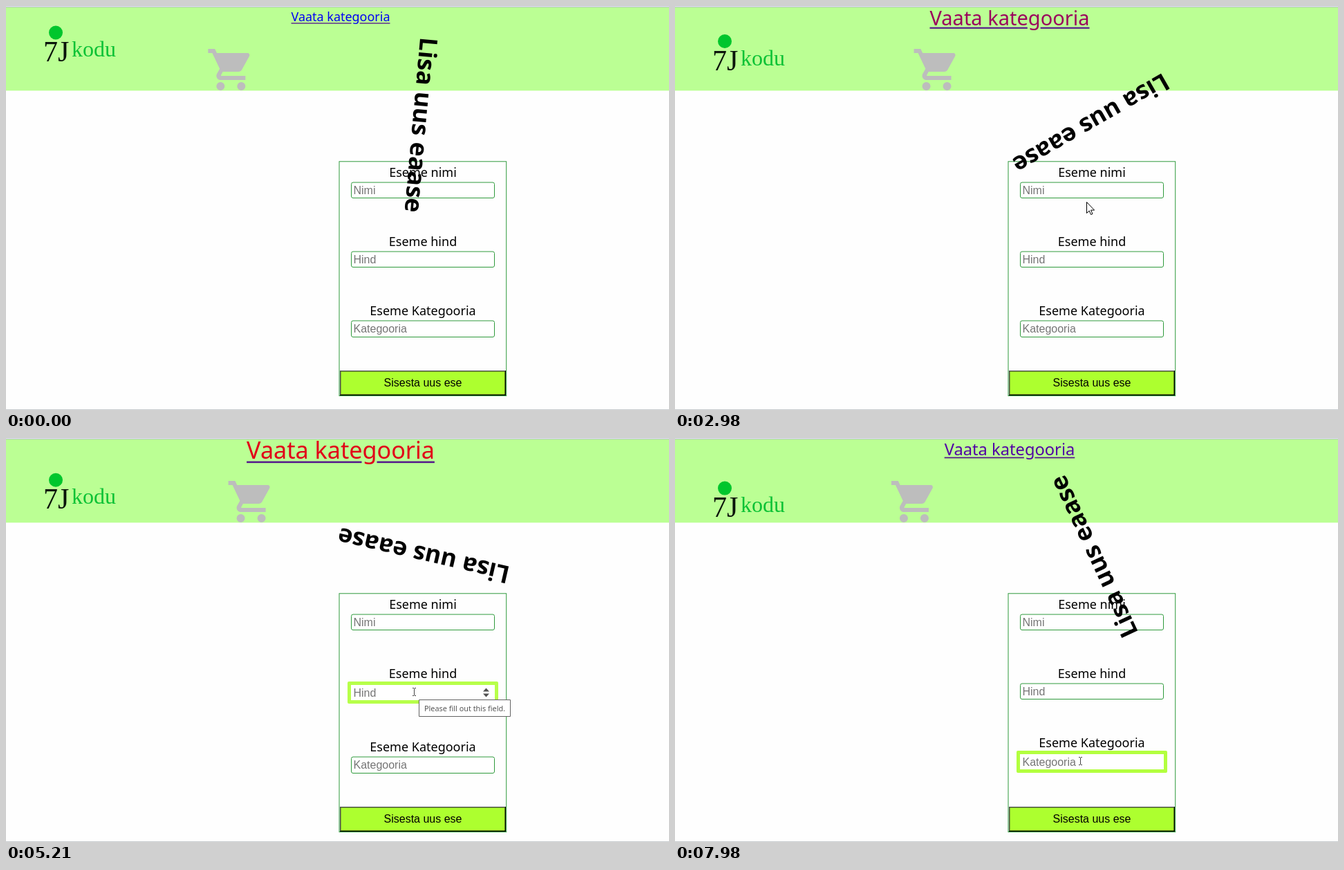
Write an HTML page with a canvas that moves like this. It is 959x584 px and loops after 8000 ms.

```html
<!DOCTYPE html>
<html lang="et">
<head>
<meta charset="utf-8">
<title>Lisa uus ese</title>
<style>
html, body { margin: 0; width: 100%; height: 100%; overflow: hidden; background: #fefefe; }
canvas { display: block; width: 959px; height: 584px; }
</style>
</head>
<body>
<canvas id="stage" width="959" height="584"></canvas>
<script>
const c = document.getElementById('stage').getContext('2d');
const LOOP = 8000;
const SECOND = 0.9585; // length of one animation second in playback
const UI = '"Noto Sans", sans-serif';
const FIELD = '"Liberation Sans", Arial, sans-serif';
const SERIF = '"Liberation Serif", serif';
const GREEN = '#2f9a3c', LIME = [173, 255, 47], PALE = [227, 255, 196];

const fields = [
  { label: 'Eseme nimi', hint: 'Nimi', from: 2.05, to: 2.93, tip: 2.66 },
  { label: 'Eseme hind', hint: 'Hind', from: 3.12, to: 7.6, tip: 3.55, spin: true },
  { label: 'Eseme Kategooria', hint: 'Kategooria', from: 7.88, to: 9, tip: 9 }
];

// time, x, y
const mousePath = [
  [1.58, 884, 531], [1.67, 826, 477], [2.05, 603, 275], [2.12, 603, 271],
  [2.6, 596, 271], [2.9, 596, 271], [3.15, 590, 367], [7.55, 590, 367], [7.91, 586, 467]
];

const cart = new Path2D('M7 18a2 2 0 1 0 0 4 2 2 0 0 0 0-4zM1 2v2h2l3.6 7.59-1.35 2.45' +
  'C5.09 14.32 5 14.65 5 15c0 1.1.9 2 2 2h12v-2H7.42c-.14 0-.25-.11-.25-.25l.03-.12.9-1.63h7.45' +
  'c.75 0 1.41-.41 1.75-1.03l3.58-6.49A1 1 0 0 0 20 4H5.21l-.94-2zM17 18a2 2 0 1 0 0 4 2 2 0 0 0 0-4z');
const arrow = new Path2D('M.5.5v16l3.7-3.5 2.4 5.5 2.4-1-2.4-5.4h5z');

const tri = x => 1 - Math.abs(1 - ((x % 2) + 2) % 2);
const lerp = (a, b, k) => a + (b - a) * k;
const mix = (a, b, k) => `rgb(${a.map((v, i) => Math.round(lerp(v, b[i], k)))})`;

function rect(x, y, w, h, color) {
  c.fillStyle = color;
  c.fillRect(x, y, w, h);
}

function text(str, x, y, font, color, align = 'left') {
  c.font = font;
  c.fillStyle = color;
  c.textAlign = align;
  c.fillText(str, x, y);
}

function box(x, y, w, h, r, fill, stroke) {
  c.beginPath();
  c.roundRect(x, y, w, h, r);
  c.fillStyle = fill;
  c.fill();
  if (!stroke) return;
  c.strokeStyle = stroke;
  c.lineWidth = 1;
  c.stroke();
}

function drawHeader(t) {
  rect(0, 0, 959, 1, '#e4e6ee');
  rect(0, 1, 959, 1, '#b4c4bc');
  rect(0, 2, 959, 120.4, '#bbff94');
  drawLink(tri((t + 0.045) / (5 * SECOND)));
  drawBrand(4.27 * t);

  c.save();
  c.translate(286.1 + 63.3 * tri((t + 0.049) / SECOND), 56);
  c.scale(3, 3);
  c.fillStyle = '#bdbdbd';
  c.fill(cart);
  c.restore();
}

function drawLink(k) {
  const size = lerp(17.8, 35.9, k);
  const word = 'Vaata kategooria';
  const base = lerp(22.4, 31, k);
  c.font = `${size}px ${UI}`;
  const width = c.measureText(word).width;
  const left = 484 - width / 2;
  const thick = Math.max(1.3, size * 0.075);
  const lineY = base + size * 0.1;
  const gLeft = c.measureText('Vaata kate').width;
  const gRight = gLeft + c.measureText('g').width;
  const line = '#551a8b';
  // the underline skips the descender
  rect(left, lineY, gLeft - 1, thick, line);
  rect(left + gRight, lineY, width - gRight, thick, line);
  text(word, left, base, c.font, mix([0, 0, 245], [250, 0, 0], k));
}

function drawBrand(dy) {
  c.beginPath();
  c.arc(72, 38.5 + dy, 10, 0, Math.PI * 2);
  c.fillStyle = '#00c62d';
  c.fill();
  text('7J', 54, 80 + dy, `42px ${SERIF}`, '#0b150b');
  text('kodu', 95, 73 + dy, `32px ${SERIF}`, '#0cc235');
}

function drawField(f, top, hot, t) {
  const y = Math.floor(top);
  text(f.label, 603, y + 23, `18px ${UI}`, '#000', 'center');
  if (hot) {
    const k = tri((t - f.from) / SECOND);
    box(494, y + 28, 218, 32, 2, mix(LIME, PALE, k));
    rect(499, y + 33, 208, 22, '#fff');
  } else {
    box(499.5, y + 31, 207, 22.5 + Math.round(top) - y, 2.5, '#fff', GREEN);
  }
  text(f.hint, 502.5, y + (hot ? 50 : 48), `16px ${FIELD}`, '#757575');
  if (hot && f.spin) drawSpinner(694.5, y + 44);
}

function drawSpinner(x, y) {
  c.fillStyle = '#505050';
  for (const s of [-1, 1]) {
    c.beginPath();
    c.moveTo(x - 4.5, y + s * 1.5);
    c.lineTo(x + 4.5, y + s * 1.5);
    c.lineTo(x, y + s * 6.5);
    c.fill();
  }
}

function drawForm(t, active) {
  const grow = active < 0 ? 0 : 6;
  c.strokeStyle = GREEN;
  c.lineWidth = 1;
  c.strokeRect(482, 224.8, 241.7, 338.7 + grow);
  fields.forEach((f, i) => {
    const shift = active >= 0 && i > active ? 6 : 0;
    drawField(f, 224 + i * 100.25 + shift, i === active, t);
  });
  const y = 527 + grow;
  rect(483, y, 240, 36, '#000');
  rect(483, y, 239, 1.5, '#4c4c4c');
  rect(483, y, 1.5, 35, '#4c4c4c');
  rect(484.4, y + 1.4, 237.1, 33.1, '#adff2f');
  text('Sisesta uus ese', 603, y + 23, `16px ${FIELD}`, '#000', 'center');
}

function drawTitle(t) {
  c.save();
  c.translate(603, 172.5);
  c.rotate((95.1 + 18.78 * t) * Math.PI / 180);
  text('Lisa uus eaase', -0.3, 15.2, `bold 35.3px ${UI}`, '#000', 'center');
  c.restore();
}

function mouseAt(t) {
  const i = mousePath.findIndex(p => p[0] > t);
  if (i < 0) return mousePath[mousePath.length - 1].slice(1);
  const [a, b] = [mousePath[i - 1], mousePath[i]];
  const k = (t - a[0]) / (b[0] - a[0]);
  return [lerp(a[1], b[1], k), lerp(a[2], b[2], k)];
}

function drawMouse(t, active) {
  if (t < mousePath[0][0]) return;
  const [x, y] = mouseAt(t).map(Math.round);
  if (active >= 0 && t >= fields[active].tip) {
    box(x + 7.5, y + 11.5, 132, 24, 0, '#fff', '#636363');
    text('Please fill out this field.', x + 15, y + 28, `10.85px ${UI}`, '#575757');
  }
  c.save();
  c.translate(x, y);
  if (active >= 0) {
    rect(0, -5, 1, 10, '#444');
    for (const end of [-6, 5]) {
      rect(-2, end, 2, 1, '#444');
      rect(1, end, 2, 1, '#444');
    }
  } else {
    c.fillStyle = '#fff';
    c.fill(arrow);
    c.strokeStyle = '#000';
    c.lineWidth = 1;
    c.stroke(arrow);
  }
  c.restore();
}

// the picture advances in 90 ms ticks, restarted at a few points
function tick(ms) {
  const start = [7980, 3320, 860, 790, 0].find(s => s <= ms);
  return start + Math.floor((ms - start) / 90) * 90;
}

function draw(ms) {
  const t = tick(ms) / 1000;
  const active = fields.findIndex(f => t >= f.from && t < f.to);
  rect(0, 0, 959, 584, '#fefefe');
  drawHeader(t);
  rect(0, 583, 959, 1, '#c6cacd');
  drawForm(t, active);
  drawTitle(t);
  drawMouse(t, active);
}

const begin = performance.now();
function loop() {
  draw((performance.now() - begin) % LOOP);
  requestAnimationFrame(loop);
}
loop();
</script>
</body>
</html>
```
